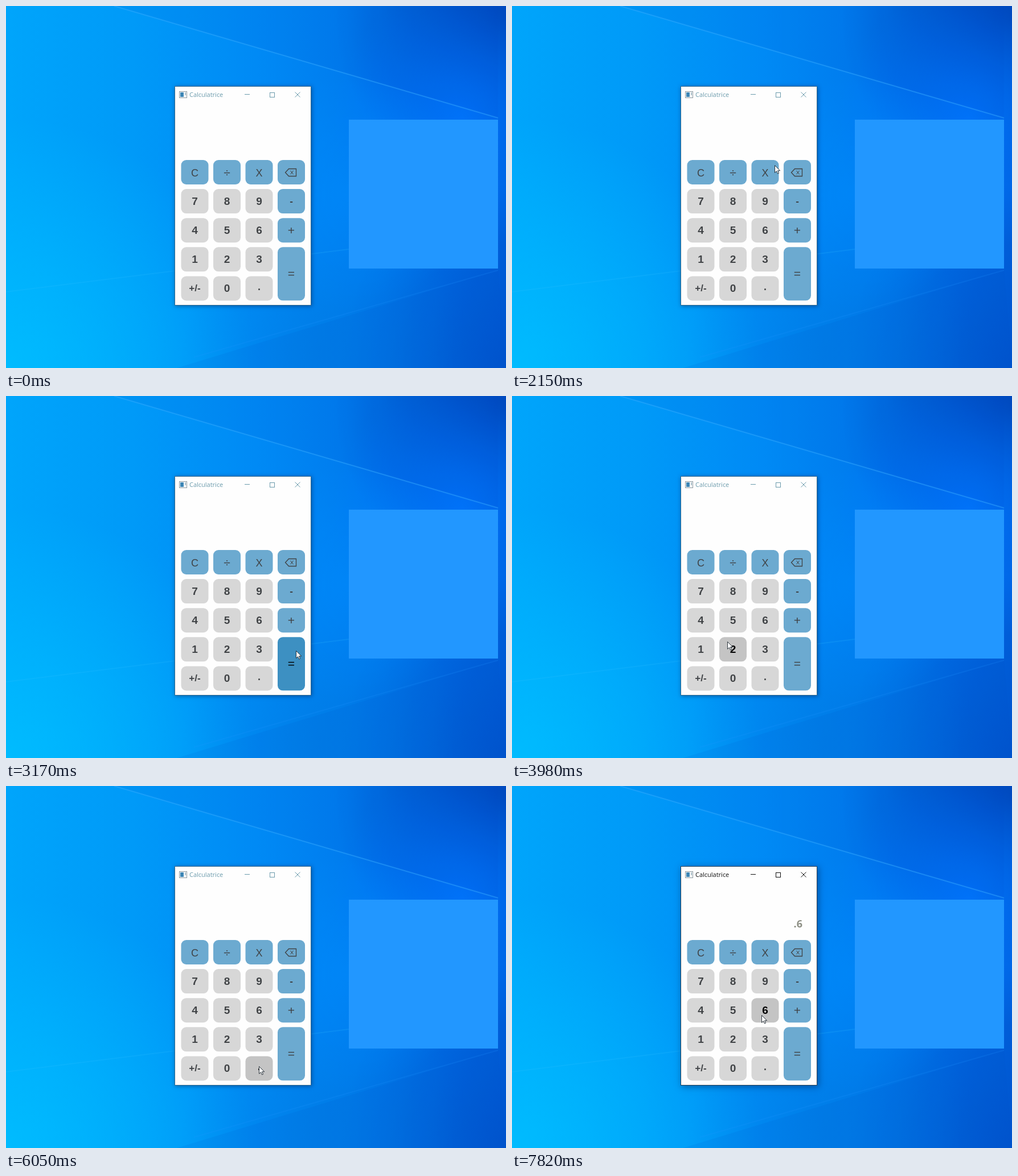
These frames come from a looping animation (878 px wide and 637 px high, 8 s). An HTML page with a canvas:

```html
<!DOCTYPE html>
<html lang="fr">
<head>
<meta charset="utf-8">
<title>Calculatrice</title>
<style>
html, body { margin: 0; width: 100%; height: 100%; overflow: hidden; background: #0086f2; }
canvas { display: block; }
</style>
</head>
<body>
<canvas id="stage" width="878" height="637"></canvas>
<script>
const W = 878, H = 637, LOOP = 8000;
const START = 700, STEP = 68.9;   // pointer appears, then moves once per step
const PRESS = 6390, RELEASE = 6660, PRESS_SIX = 7740, RELEASE_SIX = 7820;
const ctx = document.getElementById('stage').getContext('2d');
const SANS = '"Liberation Sans", Arial, sans-serif';
const HUMAN = '"Open Sans", "Noto Sans", sans-serif';

// Turning points of the pointer: time, x, y
const path = [
  [START, 821, 628], [1450, 550, 551], [2150, 461, 279], [2290, 402, 283],
  [2500, 330, 292], [2760, 365, 410], [3030, 445, 492], [3170, 511, 451],
  [3500, 435, 345], [3860, 361, 424], [3980, 373, 432], [4400, 455, 428],
  [4640, 490, 400], [4900, 457, 404], [6050, 444, 493], [6900, 444, 493],
  [7520, 438, 403]
];

const buttons = ['C÷X<', '789-', '456+', '123=', '±0.'].flatMap((keys, row) =>
  [...keys].map((key, col) => ({
    key,
    x: 307.5 + 56.5 * col,
    y: 271 + 51.1 * row,
    w: 48,
    h: key === '=' ? 94 : 43,
    blue: row === 0 || col === 3
  })));

function tick(t) {
  return START + Math.max(0, Math.round((t - START) / STEP)) * STEP;
}

function pointerAt(t) {
  const next = path.findIndex(p => p[0] > t);
  if (next <= 0) return path.at(next).slice(1);
  const [t0, x0, y0] = path[next - 1], [t1, x1, y1] = path[next];
  const k = (t - t0) / (t1 - t0);
  return [x0 + (x1 - x0) * k, y0 + (y1 - y0) * k];
}

function hit([x, y]) {
  return buttons.find(b => x >= b.x && x <= b.x + b.w && y >= b.y && y <= b.y + b.h);
}

function trace(g, points) {
  g.beginPath();
  points.forEach(([x, y]) => g.lineTo(x, y));
  g.closePath();
}

function poly(g, points, fill) {
  trace(g, points);
  g.fillStyle = fill;
  g.fill();
}

function line(g, x0, y0, x1, y1, color, width = 1) {
  g.beginPath();
  g.moveTo(x0, y0);
  g.lineTo(x1, y1);
  g.strokeStyle = color;
  g.lineWidth = width;
  g.stroke();
}

function cross(x, y, rx, ry, color) {
  line(ctx, x - rx, y - ry, x + rx, y + ry, color);
  line(ctx, x + rx, y - ry, x - rx, y + ry, color);
}

function text(str, x, y, font, color, align = 'center') {
  ctx.font = font;
  ctx.textAlign = align;
  ctx.fillStyle = color;
  ctx.fillText(str, x, y);
}

function glow(g, x, y, r, rgb, alpha) {
  const fill = g.createRadialGradient(x, y, 0, x, y, r);
  fill.addColorStop(0, `rgba(${rgb},${alpha})`);
  fill.addColorStop(1, `rgba(${rgb},0)`);
  g.fillStyle = fill;
  g.fillRect(0, 0, W, H);
}

function makeBackdrop() {
  const canvas = document.createElement('canvas');
  canvas.width = W;
  canvas.height = H;
  const g = canvas.getContext('2d');
  const base = g.createLinearGradient(0, 0, W, 0);
  ['#00a5fb', '#009af8', '#008af5', '#0077ec', '#0060dc']
    .forEach((c, i) => base.addColorStop(i / 4, c));
  g.fillStyle = base;
  g.fillRect(0, 0, W, H);
  glow(g, 0, H, 440, '0,190,255', 0.9);
  glow(g, W, 20, 300, '0,62,175', 0.8);
  glow(g, W, H, 300, '0,72,190', 0.5);
  glow(g, 560, 610, 250, '0,122,220', 0.45);
  glow(g, 800, 200, 230, '0,118,255', 0.85);
  glow(g, 600, 330, 210, '0,142,255', 0.5);

  // Light beams
  poly(g, [[190, 0], [864, 197], [864, 0]], 'rgba(0,70,190,0.08)');
  poly(g, [[300, H], [864, 465], [W, H]], 'rgba(0,80,195,0.10)');
  line(g, 190, 0, 864, 197, 'rgba(60,175,255,0.42)', 2);
  line(g, 0, 503, 602, 428, 'rgba(60,190,255,0.16)', 2);
  line(g, 330, 618, 864, 465, 'rgba(40,150,255,0.16)', 2);

  g.fillStyle = '#2297ff';
  g.fillRect(602, 200, 262, 262);
  return canvas;
}

const backdrop = makeBackdrop();

function drawWindow(active) {
  ctx.save();
  ctx.shadowColor = 'rgba(0,25,70,0.5)';
  ctx.shadowBlur = active ? 11 : 7;
  ctx.shadowOffsetX = ctx.shadowOffsetY = active ? 2 : 1;
  ctx.fillStyle = active ? '#2b4053' : '#3a6c8d';
  ctx.fillRect(296, 141, 240, 386);
  ctx.restore();
  ctx.fillStyle = '#fefefe';
  ctx.fillRect(297, 142, 238, 384);

  const ink = active ? '#101010' : '#6b9bac';
  ctx.fillStyle = '#3e86b5';
  ctx.fillRect(306, 152, 6, 8);
  ctx.fillStyle = '#a8bdc8';
  ctx.fillRect(314, 152, 2, 5);
  ctx.lineWidth = 1;
  ctx.strokeStyle = '#8b989f';
  ctx.strokeRect(304.5, 150.5, 13, 11);
  text('Calculatrice', 322, 160, `11px ${HUMAN}`, ink, 'left');
  line(ctx, 419, 155.5, 428, 155.5, ink);
  ctx.strokeRect(463.5, 152.5, 8, 8);
  cross(512, 156, 4.5, 4.5, ink);
}

function drawBackspace(x, y, color) {
  trace(ctx, [[x - 10.5, y], [x - 4.5, y - 6.5], [x + 8.5, y - 6.5], [x + 8.5, y + 6.5], [x - 4.5, y + 6.5]]);
  ctx.strokeStyle = color;
  ctx.lineWidth = 1.3;
  ctx.stroke();
  cross(x + 1, y, 2.5, 3.2, color);
}

function drawLabel({ key, x, y, w, h, blue }, color) {
  const cx = x + w / 2, cy = Math.round(y + h / 2);
  if (key === '<') drawBackspace(cx, cy, color);
  else if (key === '±') text('+/-', cx, cy + 5, `bold 17px ${SANS}`, color);
  else if (key === '.') text('.', cx, cy + 3, `bold 18px ${SANS}`, color);
  else if (key === '-') text('-', cx, cy + 5, `bold 17px ${SANS}`, color);
  else if (/[CX]/.test(key)) text(key, cx, cy + 7, `18px ${SANS}`, color);
  else if (blue) text(key, cx, cy + 7, `21px ${SANS}`, color);
  else text(key, cx, cy + 6, `bold 19px ${SANS}`, color);
}

function drawButton(b, hover, pressed) {
  ctx.beginPath();
  ctx.roundRect(b.x, b.y, b.w, b.h, 9);
  if (b.blue) ctx.fillStyle = hover ? '#3d90c2' : '#6caad0';
  else ctx.fillStyle = pressed ? '#b9b9b9' : hover ? '#c4c4c4' : '#d7d7d7';
  ctx.fill();
  drawLabel(b, hover ? '#000' : '#404346');
}

function drawPointer([x, y]) {
  ctx.save();
  ctx.translate(Math.round(x) + 0.5, Math.round(y) + 0.5);
  ctx.scale(0.8, 0.8);
  poly(ctx, [[0, 0], [0, 16], [3.8, 12.6], [6.3, 18.2], [8.8, 17.1], [6.4, 11.6], [11.5, 11.6]], '#fff');
  ctx.strokeStyle = '#16202a';
  ctx.lineWidth = 1.1;
  ctx.stroke();
  ctx.restore();
}

function draw(t) {
  ctx.drawImage(backdrop, 0, 0);
  drawWindow(t >= PRESS);

  // Hover trails the pointer by one step
  const now = tick(t);
  const hover = t >= START && hit(pointerAt(now - STEP));
  const pressed = (t >= PRESS && t < RELEASE) || (t >= PRESS_SIX && t < RELEASE_SIX);
  buttons.forEach(b => drawButton(b, b === hover, b === hover && pressed));

  const entry = t >= RELEASE_SIX ? '.6' : t >= RELEASE ? '.' : '';
  text(entry, 510, 249, `bold 18px ${HUMAN}`, '#8e9085', 'right');
  if (t >= START) drawPointer(pointerAt(now));
}

const began = performance.now();
function frame() {
  draw((performance.now() - began) % LOOP);
  requestAnimationFrame(frame);
}
frame();
</script>
</body>
</html>
```
